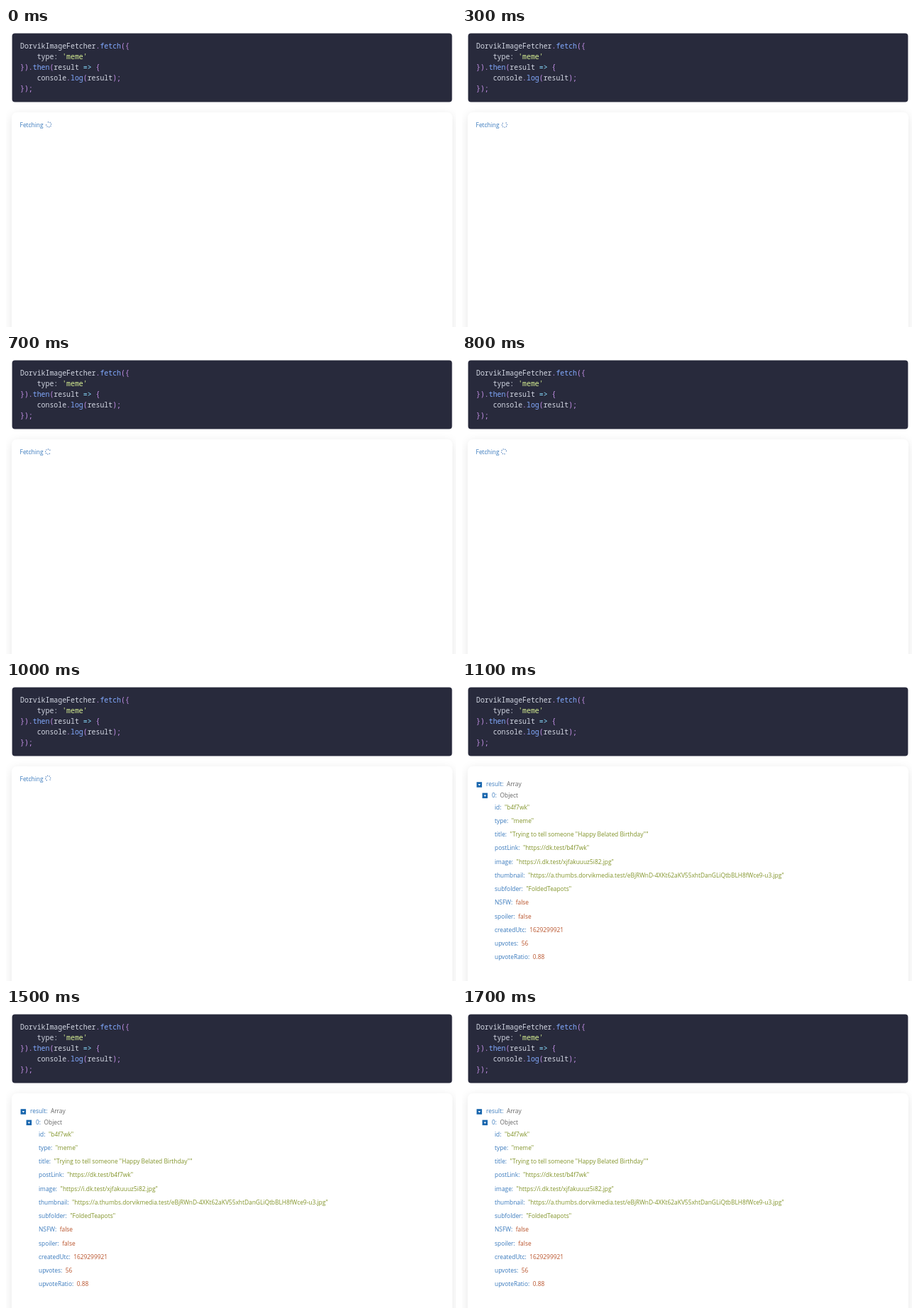
Write an HTML page that moves like this. It is 634 px wide and 422 px high and loops after 3100 ms.

```html
<!DOCTYPE html>
<html lang="en">
<head>
<meta charset="utf-8">
<title>Fetch demo</title>
<style>
  html, body { margin: 0; width: 100%; height: 100%; overflow: hidden; background: #fff; }
  #stage { position: relative; width: 634px; height: 422px; overflow: hidden; }
  .output { position: absolute; left: 8px; top: 119px; width: 621px; height: 330px; border-radius: 7px; background: #fff; box-shadow: 0 3px 14px rgba(0, 0, 0, .1); }
  svg { position: absolute; left: 0; top: 0; }
  text { white-space: pre; }
  .src { font: 500 9.87px "Noto Sans Mono", monospace; fill: #d3d7e3; }
  .ui { font: 8.4px "Open Sans", "Noto Sans", sans-serif; }
  .fn { fill: #82aaff; }
  .punct { fill: #c792ea; }
  .str { fill: #d8f093; }
  .op { fill: #89ddff; }
  .key { fill: #3a7abd; }
  .kind { fill: #666; }
  .text { fill: #82942a; }
  .value { fill: #b8522a; }
</style>
</head>
<body>
<div id="stage">
  <div class="output"></div>
  <svg width="634" height="422" viewBox="0 0 634 422">
    <rect x="8.6" y="7.6" width="619.8" height="96.8" rx="4" fill="#282a3c"/>
    <g id="source" class="src"></g>
    <g id="loader" class="ui">
      <text class="key" x="19.6" y="140">Fetching</text>
      <g id="spinner" fill="#4478b8"></g>
    </g>
    <g id="tree" class="ui"></g>
  </svg>
</div>
<script>
const LOOP = 3100, READY = 1100, STEP = 100, TURN = 25;
const NS = "http://www.w3.org/2000/svg";
const $ = id => document.getElementById(id);

function add(parent, tag, attrs, content = "") {
  const el = document.createElementNS(NS, tag);
  for (const name in attrs) el.setAttribute(name, attrs[name]);
  el.textContent = content;
  return parent.appendChild(el);
}

// Each line is a list of [text, class] runs.
const lines = [
  [["DorvikImageFetcher"], [".", "punct"], ["fetch", "fn"], ["({", "punct"]],
  [["    type: "], ["'meme'", "str"]],
  [["})", "punct"], [".", "punct"], ["then", "fn"], ["(", "punct"], ["result "], ["=>", "op"], [" {", "punct"]],
  [["    console"], [".", "punct"], ["log", "fn"], ["(", "punct"], ["result"], [");", "punct"]],
  [["});", "punct"]]
];
lines.forEach((runs, i) => {
  const line = add($("source"), "text", { x: 20, y: 29.4 + i * 15 });
  for (const [text, cls = ""] of runs) add(line, "tspan", { class: cls }, text);
});

function row(x, y, key, value, cls) {
  const line = add($("tree"), "text", { x, y });
  add(line, "tspan", { class: "key" }, key + ":");
  add(line, "tspan", { class: cls, dx: 4.5 }, value);
}

function toggle(x, y) {
  add($("tree"), "rect", { x, y, width: 7.5, height: 7.5, fill: "#1765ad" });
  add($("tree"), "path", { d: `M${x + 2} ${y + 2.8}h3.6l-1.8 2.6z`, fill: "#fff" });
}

const fields = {
  id: "b4f7wk",
  type: "meme",
  title: 'Trying to tell someone "Happy Belated Birthday"',
  postLink: "https://dk.test/b4f7wk",
  image: "https://i.dk.test/xjfakuuuz5i82.jpg",
  thumbnail: "https://a.thumbs.dorvikmedia.test/eBjRWnD-4XKt62aKV55xhtDanGLiQtbBLH8fWce9-u3.jpg",
  subfolder: "FoldedTeapots",
  NSFW: false,
  spoiler: false,
  createdUtc: 1629299921,
  upvotes: 56,
  upvoteRatio: 0.88
};

toggle(20.6, 141.2);
row(34, 147.3, "result", "Array", "kind");
toggle(28.6, 156.6);
row(42, 163.2, "0", "Object", "kind");
Object.entries(fields).forEach(([key, value], i) => {
  const isText = typeof value === "string";
  row(46, 179.6 + i * 19.25, key, isText ? `"${value}"` : String(value), isText ? "text" : "value");
});

// Seven dots on a ring with one place left open.
for (let i = 1; i < 8; i++) {
  const a = i * Math.PI / 4;
  add($("spinner"), "circle", { cx: 3.5 * Math.cos(a), cy: 3.5 * Math.sin(a), r: 0.7 });
}

function draw() {
  const t = performance.now() % LOOP;
  const loading = t < READY;
  $("loader").style.display = loading ? "" : "none";
  $("tree").style.display = loading ? "none" : "";
  const angle = Math.max(0, Math.floor(t / STEP) - 1) * TURN;
  $("spinner").setAttribute("transform", `translate(59.6 136.3) rotate(${angle}) translate(.5 0) rotate(-145)`);
  requestAnimationFrame(draw);
}
draw();
</script>
</body>
</html>
```
